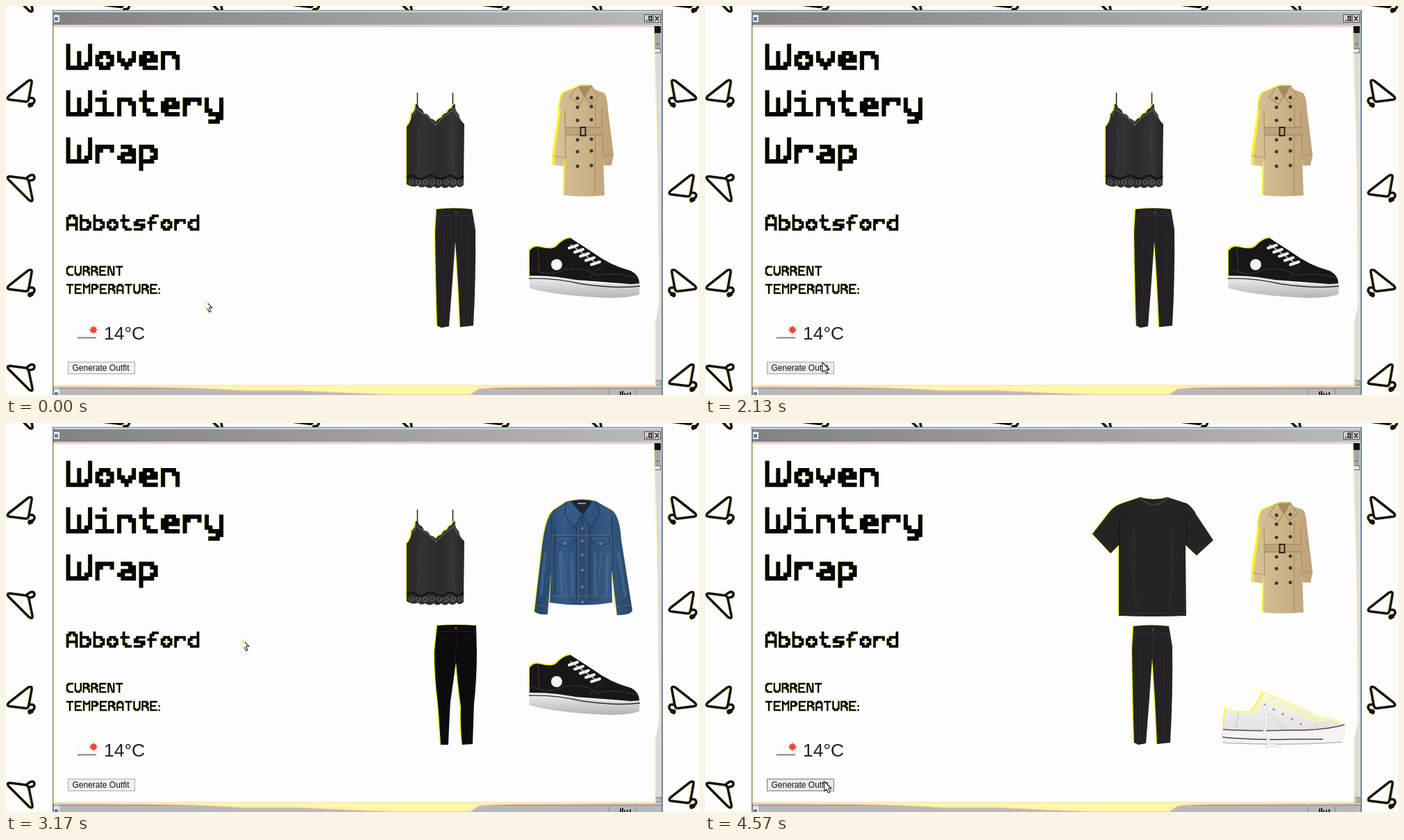
These frames come from a looping animation (998 by 561 pixels, 4610 ms). An HTML page:

```html
<!DOCTYPE html>
<html lang="en">
<head>
<meta charset="utf-8">
<title>Outfit generator</title>
<style>
html,body{margin:0;width:100%;height:100%;overflow:hidden;background:#fdfdfe}
svg{display:block;width:100vw;height:100vh}
text{font-family:"Liberation Sans",Arial,sans-serif}
</style>
</head>
<body>
<svg id="stage" viewBox="0 0 998 561" preserveAspectRatio="none">
<defs>
<linearGradient id="bar"><stop stop-color="#828282"/><stop offset="1" stop-color="#b9b9b9"/></linearGradient>
<linearGradient id="silk"><stop stop-color="#262627"/><stop offset=".3" stop-color="#333334"/><stop offset=".55" stop-color="#2a2a2b"/><stop offset=".8" stop-color="#343435"/><stop offset="1" stop-color="#252525"/></linearGradient>
<linearGradient id="sand"><stop stop-color="#d8c298"/><stop offset=".45" stop-color="#cdb58a"/><stop offset="1" stop-color="#bca177"/></linearGradient>
<linearGradient id="denim"><stop stop-color="#274466"/><stop offset=".3" stop-color="#345a85"/><stop offset=".5" stop-color="#2a4a70"/><stop offset=".75" stop-color="#355a84"/><stop offset="1" stop-color="#294766"/></linearGradient>
<linearGradient id="sole" x2="0" y2="1"><stop stop-color="#f2f2f2"/><stop offset="1" stop-color="#b4b4b6"/></linearGradient>
<linearGradient id="canvas" x2="0" y2="1"><stop stop-color="#fafaf4"/><stop offset="1" stop-color="#dcdce2"/></linearGradient>
</defs>
<g id="hangers" fill="none" stroke-linecap="round" stroke-linejoin="round"></g>
<g id="frame">
<path d="M67 6H946V561H67Z" fill="#dcdcde"/>
<path d="M66 6.5H946" stroke="#6f9aa0" stroke-width="1.6"/>
<path d="M68 8V561" stroke="#60666a" stroke-width="1.6"/>
<path d="M945 7V561" stroke="#527079" stroke-width="1.6"/>
<rect x="69" y="9" width="875" height="18" fill="url(#bar)"/>
<path d="M69 28H944" stroke="#d9d4d4" stroke-width="2"/>
<g fill="#d2d2d2" stroke="#55585a"><rect x="919.5" y="12.5" width="11" height="11"/><rect x="932.5" y="12.5" width="10" height="11"/></g>
<path d="M922 21H924M926 15H929V21H926ZM935 15L940 21M940 15L935 21" stroke="#111" stroke-width="1.4" fill="none"/>
<g id="icon"><rect x="69" y="13" width="8" height="10" fill="#eee"/><rect x="70" y="16" width="5" height="5" fill="#4a7fc0"/></g>
<use href="#icon" y="541"/>
<rect x="933" y="29" width="10" height="10" fill="#111"/>
<rect x="933" y="39" width="10" height="22" fill="#a7a7a9"/>
<path d="M936 55H941" stroke="#555"/>
<rect x="933.5" y="61.5" width="9" height="6" fill="#e4e4e4" stroke="#666"/>
<rect x="77" y="549" width="867" height="12" fill="#b8b8ba"/>
<path d="M69 551.5H944" stroke="#8d8d90"/>
<path d="M868.5 553V561M907.5 553V561" stroke="#88888b"/>
<path d="M885 561V556M888 561V555M891 561V558M895 561V558M899 561V557" stroke="#222" stroke-width="2"/>
<rect x="935" y="540" width="8" height="7" fill="#bcbcbe" stroke="#777"/>
<path d="M69 547H936L935 549L760 550Q690 550 680 553L668 561H560Q480 558 420 555L340 555Q290 551 200 550L69 549Z" fill="#fdf8a7" stroke="#f3b7b7" stroke-width="1.3"/>
<path d="M69 29.5H933L934 67L939 220L941 430L935 458V547H69Z" fill="#fdfdfe" stroke="#faf0b4" stroke-width="1.5"/>
<path d="M69 29.5H933" stroke="#eec3c6" stroke-width="1.5"/>
<path d="M935 458L941 430L938 180" fill="none" stroke="#f5dcda"/>
</g>
<g id="words" fill="none" stroke-linecap="square"></g>
<g id="weather">
<path d="M103 478Q100 475 104 471Q106 463 113 464Q119 463 121 470Q131 469 131 475L130 478Z" fill="#fffefb" stroke="#f6efcf" stroke-width=".8"/>
<path d="M103 478.5H130" stroke="#8a8079" stroke-width="2"/>
<circle cx="126" cy="467" r="4" fill="#e8262a"/>
<path d="M126 461V473M120 467H132M122 463L130 471M130 463L122 471" stroke="#f04a38" stroke-width="1.3"/>
<text x="141" y="481" font-size="26.5" fill="#222">14°C</text>
</g>
<rect id="button" x="89.5" y="513.5" width="96" height="17" fill="#f0f0f0"/>
<text x="95.5" y="526" font-size="12" fill="#111">Generate Outfit</text>
<g id="clothes"></g>
<g id="cursor" stroke-linejoin="round">
<path d="M0 0V14L3.2 11.2L5.6 16.5L8 15.5L5.7 10.2H10Z" fill="#fff"/>
<path id="edge" d="M10 10.2L0 0V14L3.2 11.2" fill="none" stroke-width="1.2"/>
<path d="M3.2 11.2L5.6 16.5L8 15.5L5.7 10.2H10L4 4" fill="none" stroke="#333" stroke-width="1.2"/>
</g>
</svg>
<script>
const $ = id => document.getElementById(id);
const LOOP = 4610, YELLOW = '#fdf51c';

// Hangers, drawn around their centre
const hangerA = 'M8 12L-16 9Q-21 8 -17 4L11 -18Q17 -21 16 -15L12 7Q11 12 8 12M12 7Q20 5 20 11Q19 16 13 15Q11 17 13 19L17 17';
const hangerB = 'M8 -14L-15 -17Q-21 -17 -17 -12L12 17Q18 21 17 15L12 -9Q11 -13 8 -14L13 -18Q19 -21 20 -16Q20 -11 13 -11';
function hanger(d, x, y, flip = 1) {
  const path = (color, width, dx) =>
    `<path d="${d}" transform="translate(${x + dx} ${y}) scale(${flip} 1)" stroke="${color}" stroke-width="${width}"/>`;
  return path('#faf7a0', 4, -1) + path('#111', 3.5, 0);
}
let hangers = '';
for (let i = 0; i < 8; i++) hangers += hanger(i % 2 ? hangerA : hangerB, 21 + 136.5 * i, -10.5);
for (let i = 0; i < 4; i++) {
  const y = 126 + 136.7 * i;
  hangers += hanger(i % 2 ? hangerB : hangerA, 21, y);
  hangers += hanger(hangerA, i % 2 ? 974 : 975, y, i % 2 ? 1 : -1);
}
$('hangers').innerHTML = hangers;

// Stroke lettering on a 5 by 7 grid
const glyphs = {
  W: 'M0 0V6H3V2M3 6H5V5H6V0', A: 'M0 6V1H1V0H3V1H4V6M0 4H4',
  C: 'M4 0H1V1H0V5H1V6H4', U: 'M0 0V5H1V6H3V5H4V0',
  R: 'M0 6V0H3V1H4V2H3V3H0M3 3V4H4V6', E: 'M4 0H0V6H4M0 3H3',
  N: 'M0 6V0H1L3 6H4V0', T: 'M0 0H4M2 0V6', M: 'M0 6V0L2 2L4 0V6',
  P: 'M0 6V0H3V1H4V2H3V3H0', ':': 'M0 3V3.01M0 6V6.01',
  a: 'M1 2H3V3H4V6H1V5H0M1 4H4', b: 'M0 0V6H3V5H4V3H3V2H0',
  d: 'M4 0V6H1V5H0V3H1V2H4', e: 'M4 6H1V5H0V3H1V2H3V3H4V4H0',
  f: 'M1 6V1H2V0H4M0 3H3', i: 'M0 2H2V6M0 6H4M2 0V.01',
  n: 'M0 6V2H3V3H4V6', o: 'M1 2H3V3H4V5H3V6H1V5H0V3H1Z',
  p: 'M0 8V2H3V3H4V5H3V6H0', r: 'M0 6V2M0 3H1V2H4V3',
  s: 'M4 2H1V3H0V4H4V5H3V6H0', t: 'M1 0V5H2V6H4M0 2H3',
  v: 'M0 2V4H1V5H2V6M2 5H3V4H4V2', y: 'M0 2V5H1V6H4M4 2V7H3V8H1'
};
function write(word, top, unit) {
  let x = 0, shapes = '';
  for (const c of word) {
    shapes += `<path d="${glyphs[c]}" transform="translate(${x} 0)"/>`;
    x += c === 'W' ? 8 : 6;
  }
  const layer = (dx, color, width) =>
    `<g transform="translate(${87 + unit / 2 + dx} ${top + unit / 2}) scale(${unit})" stroke="${color}" stroke-width="${width}">${shapes}</g>`;
  return `<g role="img" aria-label="${word}">${layer(-.6, '#f7f36a', 1.15)}${layer(0, '#050505', 1.15)}</g>`;
}
$('words').innerHTML = write('Woven', 55, 5.25) + write('Wintery', 122, 5.25) + write('Wrap', 190, 5.25) +
  write('Abbotsford', 301, 3.24) + write('CURRENT', 375, 1.98) + write('TEMPERATURE:', 401, 2.01);

// Clothes: a silhouette with a thin yellow fringe on the left, then details
const line = (d, color, width = 1, more = '') =>
  `<path d="${d}" fill="none" stroke="${color}" stroke-width="${width}" ${more}/>`;
const shape = (d, fill) => `<path d="${d}" fill="${fill}"/>`;
const dots = (points, r, fill) => points.map(([x, y]) => `<circle cx="${x}" cy="${y}" r="${r}" fill="${fill}"/>`).join('');
const piece = (d, fill, fringe = 1.2) =>
  `<path d="${d}" fill="${YELLOW}" transform="translate(${-fringe} -.6)"/>` + shape(d, fill);
const dash = 'stroke-dasharray="2 1.5"';

let lace = '';
for (let i = 0; i < 8; i++) lace += `<circle cx="${583.5 + i * 10.1}" cy="254" r="3" fill="none" stroke="#8a8a8a" stroke-width="1.2" stroke-dasharray="1.5 1"/>`;
const camisole = line('M592.5 125V146M643.5 125V146', '#222', 1.5) +
  piece('M590 141Q594 142 595 147Q600 148 602 155Q608 155 611 162Q616 163 619 167Q622 162 627 161Q629 155 635 154Q637 148 642 147Q643 142 647 141Q646 151 652 156Q654 166 660 170L659 258Q654 264 649 259Q644 265 638 260Q632 265 627 260Q621 265 616 260Q610 265 604 260Q598 264 593 259Q587 263 577 257L577 174Q584 167 584 156Q590 151 590 141Z', 'url(#silk)', 1.5) +
  line('M590 146Q590 155 584 159M592 150Q608 158 619 172Q630 158 645 150M646 147Q646 157 654 163', '#77787a', 1.5, dash) +
  line('M595 176Q597 215 592 245M643 176Q640 215 647 246', '#3a3a3b', 2) +
  line('M577 247Q584 242 590 247T604 247T619 247T633 247T646 247T659 245', '#151515', 3) + lace;

const rows = [133, 146, 165, 193, 210, 231];
const coat = piece('M822 117L829 114L843 114L846 120L861 125Q866 130 867 151L875 215L872 230L861 230L860 218L862 273Q833 276 804 273L805 218L803 231L788 229L789 211L797 156Q797 132 803 125Z', 'url(#sand)', 2) +
  line('M798 150L790 212L790 228', YELLOW, 1.6) +
  shape('M824 116H842L838 126L833 132Z', '#a58b63') +
  line('M822 117L812 132L826 142L833 130L843 115L853 130L842 141L833 130', '#a78c61', 1.2) +
  line('M805 150L806 220M858 150L860 218M849 140L848 272M789 216L803 219M861 216L874 213', '#a88d63', 1.2) +
  shape('M806 175H859V186H806Z', '#bea47a') + line('M806 175H859M806 186H859', '#967b53') +
  line('M827.5 175H834.5V187H827.5Z', '#2c241c', 2) +
  dots(rows.flatMap(y => [[823, y], [843, y - 1]]), 2.5, '#40372c');

const trousers = piece('M620 293Q646 290 671 293L676 322Q677 390 673 461L654 463Q651 390 647 339Q643 400 638 462L627 464L621 461Q619 400 618 326Z', '#242225', 1.5) +
  line('M620 303Q646 301 673 303M648 293V337M624 305L620 322M669 305L674 322', '#343135') +
  line('M631 325L629 457M664 325L665 457', '#2c2a2e', 1.5) + dots([[648, 298]], 1, '#777');

const jeans = piece('M621 292Q647 290 677 292L678 330Q678 370 674 405L672 463L657 464Q654 435 655 410Q650 370 648 344Q644 375 640 402Q638 435 637 464L626 464Q624 430 622 405Q617 365 617 330Z', '#0c0b0d', 1.4) +
  line('M620 301Q647 299 677 301M648 301Q649 325 647 344M622 302Q624 312 634 312M675 302Q672 312 662 312', '#232125') +
  dots([[648, 296]], 1.2, '#888');

let laces = '';
for (let i = 0; i < 5; i++) laces += `M${811 + i * 8} ${349 + i * 6}L${823 + i * 8} ${345 + i * 6}`;
const skate = piece('M754 351Q760 344 770 347Q785 351 792 346Q802 335 812 334L846 356Q870 374 900 382Q913 389 912 402L754 390Z', '#171718', 1.2) +
  line('M754 352Q760 344 770 347Q785 351 792 346Q802 335 812 334', YELLOW, 1.6) +
  shape('M753 389Q790 388 830 397Q880 404 913 400L912 416Q890 423 850 420Q790 417 754 407Z', 'url(#sole)') +
  line('M753 393Q790 392 830 401Q880 408 913 404', '#2b2b2b', 1.4) +
  line('M756 380Q785 391 804 380Q838 376 849 389Q880 383 907 392M766 348L768 384M842 392Q846 382 858 376', '#57575a', 1, dash) +
  line(laces, '#f1f1ee', 4, 'stroke-linecap="round"') + line('M813 344L850 371', '#dddddd', 1.5) +
  `<circle cx="793" cy="373" r="8" fill="#f6f6f6"/>`;

const stitch = '#8d7b6c';
const jacket = piece('M806 114Q830 107 850 113L873 126Q884 135 886 168L902 270Q901 277 880 277L872 210L873 259Q830 266 783 259L785 212L780 276Q768 277 761 272L772 178Q777 136 788 126Z', 'url(#denim)', 1) +
  shape('M812 113Q830 109 845 113L831 132Z', '#1c2733') + line('M823 116H835', '#bbb', 1.5) +
  line('M798 185L800 248M815 188L816 248M848 188L848 248M866 190L865 248M777 185L770 250M882 185L892 252', '#4d78a5', 4, 'opacity=".45"') +
  line('M790 150V248M822 130V255M841 150V255M786 135L784 215M873 135L873 215', '#1f3a5b', 2.5, 'opacity=".6"') +
  shape('M806 114L813 112L829 133L818 152L805 132Z', '#345b87') + shape('M850 113L845 112L831 133L843 150L855 130Z', '#2f547e') +
  line('M806 115L805 132L818 151L829 133L843 150L855 130L850 114', '#1c3757', 1.2) +
  line('M786 162H873M835 140V258M824 145V258M800 187L808 250M858 187L850 250M784 250H873M786 168L785 214M872 166L871 214M762 262L782 265M879 266L900 262', stitch, .9, dash) +
  line('M792 164H818V173L805 178L792 173ZM843 164H869V173L856 178L843 173Z', '#20456f', 1.5) +
  line('M794 166H816M845 166H867', stitch, 1, dash) +
  dots([152, 170, 190, 212, 236, 258].map(y => [830, y]).concat([[805, 174], [856, 174]]), 1.8, '#a08672');

const tee = piece('M627 107Q646 113 666 107L694 116Q703 122 708 133L732 169L708 191L692 176L693 278Q645 280 596 278L596 176L584 188L558 160L582 129Q590 119 600 116Z', '#242424', 1.2) +
  line('M627 108Q646 128 666 108', '#3d3d3d', 2) + line('M597 176Q593 150 600 134M692 176Q697 150 690 134', '#161616', 1.5) +
  line('M561 158L586 184M706 187L729 167M597 274H692', '#343434') +
  line('M618 150Q614 210 622 265M671 150Q676 210 668 265', '#2a2a2a', 4);

let eyelets = '';
for (let i = 0; i < 6; i++) eyelets += `M${806 + i * 14} ${401 + i * 6}l16 -3`;
const plimsoll = piece('M749 411Q768 418 785 416Q796 409 803 387Q811 388 823 397L888 425Q914 427 920 440L920 455L746 455Z', 'url(#canvas)', 1.6) +
  line('M750 412Q778 423 794 414Q801 403 804 389L824 397L888 425Q910 428 918 435', '#fbf8a5', 3) +
  shape('M745 441Q795 444 840 443Q890 444 921 435Q924 450 917 460Q840 467 747 461Q742 453 745 441Z', '#f3f3f4') +
  line('M746 442Q795 445 840 443Q890 444 921 435', '#713d40', 1.5) +
  line('M745 453Q795 458 845 456H890', '#444650', 1.5) + line('M746 461Q830 466 918 460', '#b9b9be', 1.5) +
  line('M768 418L765 440M803 418Q818 417 834 442M878 443Q875 430 894 428', '#c4c4cb') +
  line(eyelets, '#f7f4b9', 4, 'stroke-linecap="round"') +
  dots([0, 1, 2, 3, 4].map(i => [806 + i * 13, 406 + i * 7]), 1.6, '#898992') +
  line('M805 407Q812 430 805 446Q815 458 811 466Q820 462 830 468', '#d4d4dc', 4) +
  line('M805 407Q812 430 805 446Q815 458 811 466Q820 462 830 468', '#fafafb', 2.4);

const outfits = [
  camisole + coat + trousers + skate,
  camisole + jacket + jeans + skate,
  tee + coat + `<g transform="translate(-3 0)">${trousers}</g>` + plimsoll
];
$('clothes').innerHTML = outfits.map(o => `<g>${o}</g>`).join('');
const looks = [...$('clothes').children];

// Pointer stops: time, x, y
const stops = [
  [0, 287, 425], [1067, 287, 425], [1100, 277, 427], [1630, 180, 503], [1850, 169, 514],
  [2700, 169, 514], [3167, 340, 312], [3240, 340, 312], [3740, 172, 517], [LOOP, 172, 517]
];
function pointer(t) {
  let i = 1;
  while (i < stops.length - 1 && t > stops[i][0]) i++;
  const [t0, x0, y0] = stops[i - 1], [t1, x1, y1] = stops[i];
  const p = Math.min(1, (t - t0) / (t1 - t0)), k = p * p * (3 - 2 * p);
  return [x0 + (x1 - x0) * k, y0 + (y1 - y0) * k];
}
function draw(time) {
  const raw = time % LOOP;
  const t = raw < 1100 ? 0 : Math.floor((raw + 5) * .03) / .03;
  const [x, y] = pointer(t);
  const over = x < 186 && y > 505;
  const look = t < 2290 ? 0 : t < 4420 ? 1 : 2;
  looks.forEach((g, i) => g.setAttribute('display', i === look ? 'inline' : 'none'));
  $('cursor').setAttribute('transform', `translate(${x.toFixed(2)} ${y.toFixed(2)})`);
  $('edge').setAttribute('stroke', over ? '#333' : '#f2e98a');
  $('button').setAttribute('stroke', over && look ? '#777' : '#aaa');
  $('button').setAttribute('fill', over ? '#e9e9e9' : '#f0f0f0');
}
const start = performance.now();
function tick(now) {
  draw(Math.max(0, now - start));
  requestAnimationFrame(tick);
}
draw(0);
requestAnimationFrame(tick);
</script>
</body>
</html>
```
